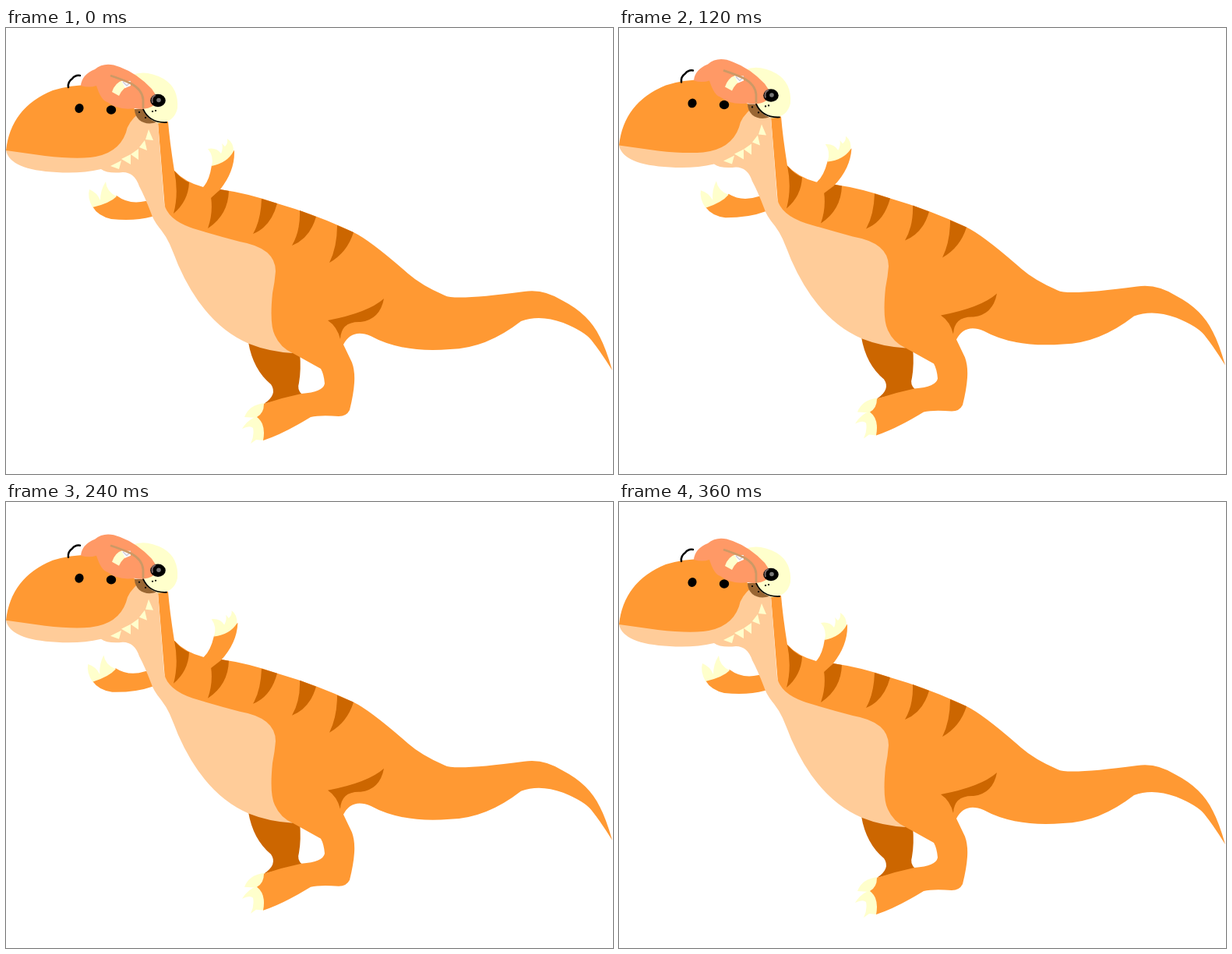
An HTML page for the animation above (400 ms loop, 779x572 px).

```html
<!DOCTYPE html>
<html lang="en">
<head>
<meta charset="utf-8">
<title>Bouncing dinosaur</title>
<style>
  html, body { margin: 0; width: 100%; height: 100%; overflow: hidden; background: #fff; }
  svg { display: block; }
  .skin { fill: #f93; }
  .belly { fill: #fc9; }
  .dark { fill: #c60; }
  .claw { fill: #ffc; }
  .line { fill: none; stroke: #000; stroke-linecap: round; }
</style>
</head>
<body>
<svg width="779" height="572" viewBox="0 0 779 572">
  <g id="dino">
    <g id="leftArm">
      <path class="skin" d="M111 229Q133 224 142 215Q158 227 179 222L192 220L192 240L187 242Q165 248 135 245Q118 241 111 229Z"/>
      <path class="claw" d="M111 230Q104 217 107 207Q117 211 121 221Q121 208 128 197Q129 210 142 216Q133 225 111 230Z"/>
    </g>

    <!-- Legs, body and tail -->
    <path class="dark" d="M311 403Q317 438 340 457Q349 470 331 482L380 470Q373 464 376 455Q379 438 377 416Z"/>
    <path class="claw" d="M332 481Q312 483 306 499L322 500Q331 493 332 481Z"/>
    <path class="claw" d="M323 498Q311 501 303 514Q313 509 317 513Q319 523 314 533L321 528L331 529Q335 512 323 498Z"/>
    <path class="skin" d="M195 121L208 120Q210 145 216 183Q230 198 253 204L275 207Q311 212 348 225Q400 240 446 262Q467 272 516 315Q533 330 563 343Q576 350 665 338Q690 334 715 350Q748 367 762 396Q770 411 778 439Q763 415 751 400Q742 389 715 378Q685 367 661 376Q616 411 570 412Q508 417 468 395Q444 385 433 406L444 429Q448 440 447 455Q446 470 441 490Q437 498 427 498Q403 496 391 499Q355 521 330 529Q334 508 322 499Q331 494 331 482Q355 474 379 469Q407 467 409 456Q408 444 404 437L368 417L330 400L205 245Z"/>
    <path class="belly" d="M195 121Q199 175 203 225Q207 246 240 257Q270 266 300 274Q346 282 346 312Q345 325 342 340Q338 380 345 394Q352 410 368 417Q337 415 312 405Q255 381 221 304Q216 291 210 277Q206 268 199 259Q189 247 186 237Q178 216 171 203Q165 185 150 185Q130 187 122 181Q96 187 65 185Q5 182 0 157L150 110L170 108Z"/>
    <path class="skin" d="M0 157Q6 102 60 80Q85 72 115 73L172 108Q156 121 154 134Q144 162 108 166Q85 168 50 164Z"/>

    <path class="dark" d="M216 183Q225 194 235 198Q234 222 215 238Q222 212 216 183M263 217L275 207L286 209Q285 240 259 257Q266 237 263 217M328 219L348 225Q340 255 317 264Q327 247 328 219M377 234L398 242Q390 270 367 279Q378 260 377 234M425 253L446 262Q438 288 415 301Q425 281 425 253M413 375Q465 365 485 347Q480 374 455 377Q430 376 429 399Q425 383 413 375"/>
    <path class="claw" d="M134 177L148 170L145 181ZM148 168L160 162L160 175ZM160 162L170 155L170 169ZM171 153L178 144L181 157ZM179 143L183 130L189 144Z"/>

    <g id="rightArm">
      <path class="skin" d="M264 176Q261 196 253 204L263 218L275 207Q294 183 293 157Z"/>
      <path class="claw" d="M264 177Q267 164 259 155Q270 153 276 161Q279 154 277 148L281 152Q285 148 284 142Q292 147 292 158Q284 173 264 177Z"/>
    </g>

    <!-- Face and headgear -->
    <ellipse cx="94" cy="103" rx="5.5" ry="6" transform="rotate(25 94 103)"/>
    <ellipse cx="135" cy="105" rx="6.2" ry="5.7"/>
    <path class="claw" d="M162 60Q180 53 202 65Q222 77 220 103Q216 121 196 122Q180 118 174 102Z"/>
    <path d="M165 104L176 104Q181 117 193 121Q180 125 171 118Q165 112 165 104Z" fill="#963"/>
    <path class="line" stroke-width="1.8" d="M176 104Q184 122 206 121"/>
    <path d="M96 74Q97 60 114 53Q127 42 146 50Q168 58 187 78L193 87Q183 93 190 99Q180 106 165 103Q144 106 130 95Q122 93 116 74Q107 77 96 74Z" fill="#f96"/>
    <ellipse cx="195" cy="93" rx="9.8" ry="8.2"/>
    <path d="M188 96Q186 88 192 86" fill="none" stroke="#766" stroke-width="2"/>
    <circle cx="196" cy="92.5" r="2.8" fill="#777"/>
    <path class="claw" d="M136 82Q140 70 150 67L162 71Q149 77 145 87Z"/>
    <path d="M148 68L160 68L160 74L153 77Z" fill="#fff"/>
    <path d="M150 69L155 74L160 69" fill="none" stroke="#ccd" stroke-width="1.5"/>
    <path d="M134 61Q149 66 160 71Q175 79 176 92L176 103" fill="none" stroke="#c96" stroke-width="2.8"/>
    <path class="line" stroke-width="2.5" d="M80 76Q79 69 85 65Q89 60 95 61"/>
    <path class="line" stroke-width="2.2" d="M171 108h.1M179 115h.1M188 107h.1M192 106h.1"/>
  </g>
</svg>
<script>
  const STEP = 40, STEPS = 10, PEAK = 4;
  const RISE = 8.75, SWING = 7.5;
  const [dino, leftArm, rightArm] = ['dino', 'leftArm', 'rightArm'].map(id => document.getElementById(id));

  // Four steps up, five steps down, then one step at rest.
  function lift(step) {
    return step < PEAK ? step / PEAK : (STEPS - 1 - step) / (STEPS - 1 - PEAK);
  }

  function draw(time) {
    const amount = lift(Math.floor(time / STEP) % STEPS);
    const angle = SWING * amount;
    dino.setAttribute('transform', `translate(0 ${-RISE * amount})`);
    leftArm.setAttribute('transform', `rotate(${-angle} 186 232)`);
    rightArm.setAttribute('transform', `rotate(${angle} 255 215)`);
  }

  const start = performance.now();
  function tick() {
    draw(performance.now() - start);
    requestAnimationFrame(tick);
  }
  tick();
</script>
</body>
</html>
```
